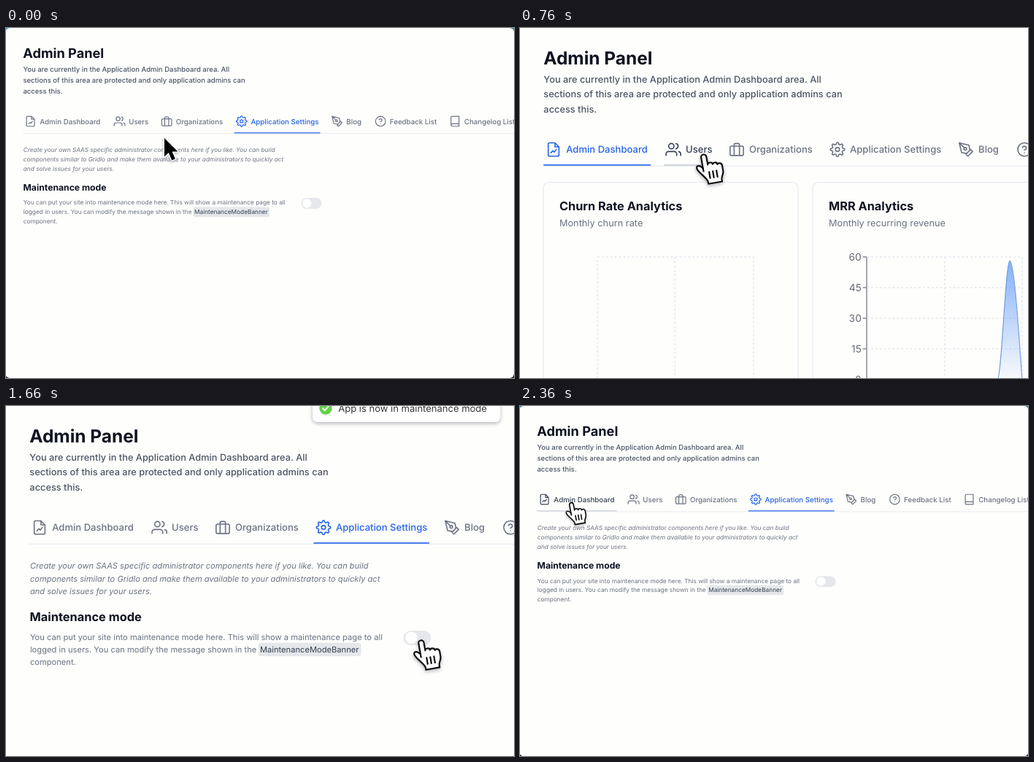
Write an HTML page that moves like this. It is 696 px wide and 480 px high and loops after 2380 ms.

```html
<!DOCTYPE html>
<html lang="en">
<head>
<meta charset="utf-8">
<title>Admin panel tour</title>
<style>
html, body { margin: 0; width: 100%; height: 100%; overflow: hidden; }
svg { display: block; width: 696px; height: 480px; }
text { font-family: Inter, sans-serif; fill: #0f1320; text-rendering: geometricPrecision; white-space: pre; }
.line { fill: none; stroke: #e3e6ef; stroke-width: .8; }
.dash { fill: none; stroke: #d9dcea; stroke-width: .75; stroke-dasharray: 2.2 2.2; }
.icon { fill: none; stroke: #6b7280; stroke-width: 1.75; stroke-linecap: round; stroke-linejoin: round; }
.tab text { fill: #6b7280; font-weight: 500; }
.tab rect { fill: none; }
.hover text { fill: #374151; }
.hover .icon { stroke: #374151; }
.hover rect { fill: #d1d5db; }
.active text { fill: #2563eb; }
.active .icon { stroke: #2563eb; }
.active rect { fill: #3b76ec; }
</style>
</head>
<body>
<svg viewBox="0 0 696 480">
  <defs>
    <linearGradient id="desk" x1="0" y1="0" x2="0" y2="1">
      <stop offset="0" stop-color="#3f8fa8"/><stop offset="1" stop-color="#23303f"/>
    </linearGradient>
    <linearGradient id="area" x1="0" y1="0" x2="0" y2="1">
      <stop offset="0" stop-color="#3b82f6" stop-opacity=".62"/>
      <stop offset="1" stop-color="#3b82f6" stop-opacity=".03"/>
    </linearGradient>
    <filter id="shade" x="-30%" y="-50%" width="160%" height="220%">
      <feDropShadow dx="0" dy="1.5" stdDeviation="1.8" flood-color="#1c2030" flood-opacity=".32"/>
    </filter>
    <clipPath id="reveal"><rect id="sweep" x="352" y="230" width="162" height="150"/></clipPath>
  </defs>
  <rect width="696" height="480" fill="url(#desk)"/>
  <g id="view"></g>
</svg>
<script>
const LOOP = 2380;
const INK = '#374151', GREY = '#6b7280', PALE = '#e5e7eb', BLUE = '#2563eb';
const $ = id => document.getElementById(id);

// ---- building blocks ----
const text = (x, y, s, size, o = {}) =>
  `<text x="${x}" y="${y}" font-size="${size}" font-weight="${o.w || 400}"` +
  `${o.c ? ` style="fill:${o.c}"` : ''}${o.i ? ' font-style="italic"' : ''}` +
  `${o.end ? ' text-anchor="end"' : ''}>${s}</text>`;
const rect = (x, y, w, h, r, attr) =>
  `<rect x="${x}" y="${y}" width="${w}" height="${h}" rx="${r}" ${attr}/>`;
const path = (d, attr) => `<path d="${d}" ${attr}/>`;
const lines = (x, y, step, rows, size, o) =>
  rows.map((s, i) => text(x, y + i * step, s, size, o)).join('');

function gear() {
  let d = '';
  for (let i = 0; i < 32; i++) {
    const a = (i - 1.5) * Math.PI / 16;
    const r = i % 4 === 1 || i % 4 === 2 ? 10.6 : 7.9;
    d += (i ? 'L' : 'M') + (12 + r * Math.sin(a)).toFixed(2) + ' ' + (12 - r * Math.cos(a)).toFixed(2);
  }
  return d + 'ZM12 9a3 3 0 1 0 0 6 3 3 0 0 0 0-6';
}

const icons = {
  file: 'M14 2H6a2 2 0 0 0-2 2v16a2 2 0 0 0 2 2h12a2 2 0 0 0 2-2V8zM14 2v6h6M8 17l3-3 2 2 3-4',
  users: 'M17 21v-2a4 4 0 0 0-4-4H5a4 4 0 0 0-4 4v2M9 3a4 4 0 1 0 0 8 4 4 0 0 0 0-8M23 21v-2a4 4 0 0 0-3-3.9M16 3.1a4 4 0 0 1 0 7.8',
  bag: 'M4 7h16a2 2 0 0 1 2 2v10a2 2 0 0 1-2 2H4a2 2 0 0 1-2-2V9a2 2 0 0 1 2-2zM16 21V5a2 2 0 0 0-2-2h-4a2 2 0 0 0-2 2v16',
  gear: gear(),
  pen: 'M12 19l7-7 3 3-7 7zM18 13l-1.5-7.5L2 2l3.5 14.5L13 18zM2 2l7.6 7.6M11 9a2 2 0 1 0 0 4 2 2 0 0 0 0-4',
  help: 'M12 2a10 10 0 1 0 0 20 10 10 0 0 0 0-20M9.1 9a3 3 0 0 1 5.8 1c0 2-3 3-3 3M12 17h.01',
  book: 'M4 19.5A2.5 2.5 0 0 1 6.5 17H20M6.5 2H20v20H6.5A2.5 2.5 0 0 1 4 19.5v-15A2.5 2.5 0 0 1 6.5 2z'
};

// label, icon, icon centre, text x, underline from, underline to
const tabs = [
  ['Admin Dashboard', 'file', 33.6, 46.3, 23.3, 132.5],
  ['Users', 'users', 155.6, 168.2, 145.8, 197],
  ['Organizations', 'bag', 220.2, 232.8, 210.5, 299.6],
  ['Application Settings', 'gear', 322.8, 335.4, 312.7, 430.5],
  ['Blog', 'pen', 453.6, 466.3, 443, 491],
  ['Feedback List', 'help', 513.2, 525.8, 503, 593],
  ['Changelog List', 'book', 615.2, 627.8, 605, 704]
];

const header = () =>
  text(23.3, 41.4, 'Admin Panel', 18.2, { w: 700 }) +
  lines(23.4, 59.5, 15.45, [
    'You are currently in the Application Admin Dashboard area. All',
    'sections of this area are protected and only application admins can',
    'access this.'
  ], 9.52, { w: 500, c: '#4b5563' }) +
  path('M23 144.8H720', 'class="line"') +
  tabs.map(([label, icon, cx, tx, a, b]) =>
    `<g class="tab">${path(icons[icon], `class="icon" transform="translate(${cx - 8.2} 119.8) scale(.68)"`)}` +
    text(tx, 131.6, label, 9.72, { w: 500 }) + rect(a, 143.1, b - a, 1.4, 0, '') + '</g>').join('');

const settings = () =>
  lines(23.8, 169.9, 13.1, [
    'Create your own SAAS specific administrator components here if you like. You can build',
    'components similar to Gridlo and make them available to your administrators to quickly act',
    'and solve issues for your users.'
  ], 8.28, { i: 1, c: GREY }) +
  text(23.5, 223.2, 'Maintenance mode', 12.2, { w: 700 }) +
  rect(256.6, 245.6, 104.4, 13.6, 2.5, `fill="${PALE}"`) +
  lines(23.8, 242.4, 12.9, [
    'You can put your site into maintenance mode here. This will show a maintenance page to all',
    'logged in users. You can modify the message shown in the',
    'component.'
  ], 8.3, { c: GREY }) +
  text(258, 255.3, 'MaintenanceModeBanner', 8.3, { c: INK }) +
  rect(404.2, 233.1, 28.2, 14.9, 7.45, 'id="track"') +
  '<circle id="knob" cx="412.2" cy="240.5" r="6.2" fill="#fff"/>';

const card = (x, title, sub) =>
  rect(x, 161.3, 259.6, 330, 6, 'class="line"') +
  text(x + 16.3, 190.1, title, 12.15, { w: 700 }) +
  text(x + 16.3, 206.4, sub, 9.5, { c: GREY });

function dashboard() {
  let s = card(23.1, 'Churn Rate Analytics', 'Monthly churn rate') +
    card(297.5, 'MRR Analytics', 'Monthly recurring revenue') +
    path('M78.1 237.5H237.2V362.5H78.1ZM157 237.5V362.5', 'class="dash"') +
    path('M432 237.5V362.5M510.8 237.5V362.5', 'class="dash"') +
    path('M352.5 237.5V362.5', 'stroke="#6d7078" stroke-width=".9"');
  for (let i = 0; i < 5; i++) {
    const y = 237.5 + i * 31.25;
    s += path(`M352.5 ${y}H510.8`, 'class="dash"') +
      path(`M348.5 ${y}h4`, 'stroke="#6d7078" stroke-width=".9"') +
      text(347.2, y + 3.7, 60 - i * 15, 10.3, { c: '#666a73', end: 1 });
  }
  const peak = 'M352.5 362.5H485.6C489.8 362.5 494 241.3 498.2 241.3S506.6 302 510.8 362.5';
  return s + `<g clip-path="url(#reveal)">${path(peak + 'Z', 'fill="url(#area)"')}` +
    path(peak, 'fill="none" stroke="#74a0dc" stroke-width=".9"') + '</g>';
}

const cross = (x, y) =>
  path(`M${x - 3.8} ${y - 3.8}l7.6 7.6m0-7.6l-7.6 7.6`, 'stroke="#e01b24" stroke-width="2.4" stroke-linecap="round"');
const check = (x, y) =>
  path(`M${x - 2.9} ${y + .2}l2 2.2 3.9-4.6`, 'fill="none" stroke="#fff" stroke-width="1.5" stroke-linecap="round" stroke-linejoin="round"');
const tick = (x, y) => rect(x - 5.2, y - 5.2, 10.4, 10.4, 1.6, 'fill="#12b52e"') + check(x, y);

function users() {
  let s = text(23.4, 170.1, 'Email', 8.8, { w: 500, c: INK }) +
    rect(23.4, 175.9, 205.6, 24.5, 4, 'class="line"') +
    text(31.4, 191.4, 'Search users', 8.2, { c: '#9ca3af' }) +
    rect(239.6, 175, 92.2, 25.8, 4.5, `fill="${BLUE}"`) +
    path('M252.5 187.8h9.6m-4.8-4.8v9.6', 'stroke="#fff" stroke-width="1.2"') +
    text(265.4, 191.3, 'Create User', 9.55, { w: 600, c: '#fff' }) +
    rect(23.4, 210.8, 720, 29.7, 4, 'fill="#f8fafc"') +
    rect(23.4, 210.8, 720, 200, 4, 'class="line"');
  for (const x of [116.1, 272.9, 331.7, 425.4, 502]) s += path(`M${x} 210.8V400`, 'class="line"');
  const cols = [39.5, 131.7, 289.3, 348, 441.2];
  ['Full Name', 'Email', 'Admin', 'Created At', 'Confirmed'].forEach((h, i) => {
    s += text(cols[i], 228.8, h, 8.75, { w: 500, c: '#4b5563' });
  });
  [['-', 'mistyfir@example.com', '02', 1], ['test', 'p.wexford50@mail.example', '02', 1],
   ['-', 'kitebyte@example.com', '01', 0]].forEach(([name, mail, day, ok], i) => {
    const y = 259.3 + i * 38;
    s += path(`M23.4 ${y - 18.8}H720`, 'class="line"') +
      text(cols[0], y + 3.5, name, 9.7) + text(cols[1], y + 3.5, mail, 9.7) +
      text(cols[3], y + 3.5, day + ' Aug 2023', 9.9) +
      cross(293.8, y) + (ok ? tick : cross)(446.3, y);
  });
  return s + path('M23.4 354.3H720', 'class="line"');
}

const toast = (id, x, w, msg) =>
  `<g id="${id}">${rect(x, -8, w, 28.5, 5, 'fill="#fff" filter="url(#shade)"')}` +
  `<circle cx="${x + 13.4}" cy="6.3" r="6.5" fill="#61d345"/>${check(x + 13.4, 6.3)}` +
  text(x + 26.2, 9.8, msg, 9.68, { c: '#363636' }) + '</g>';

const cursors = () =>
  `<g id="cursor" filter="url(#shade)"><g id="arrow">` +
  path('M0 0V25.5L5.8 20 10.2 30.5 14.9 28.5 10.6 18.4H18.5Z',
    'fill="#050505" stroke="#fff" stroke-width="2.8" stroke-linejoin="round" paint-order="stroke"') +
  '</g><g id="hand" transform="rotate(-10)" stroke="#0a0a0a" stroke-width="1.6" stroke-linecap="round" stroke-linejoin="round">' +
  path('M-2.7 2.8a2.7 2.7 0 0 1 5.4 0V11c.5-2.4 4.8-2.2 5 .4c.8-2 4.6-1.6 4.8 1c.9-1.6 4.5-.8 4.5 2V20c0 3.4-2.6 5-2.8 8V30.5H0V28C-1 24-5.5 20-8 15.5C-11 10.5-6.5 8.5-2.7 14Z', 'fill="#fff"') +
  path('M2.8 18.5v6.5M6.6 18.5v6.5M10.4 18.5v6.5M-2.7 14v3', 'fill="none"') + '</g></g>';

const pages = { settings, dashboard, users };
$('view').innerHTML = rect(-.8, 0, 696.8, 480, 6, 'fill="#fefefc"') + header() +
  Object.keys(pages).map(k => `<g id="${k}">${pages[k]()}</g>`).join('') +
  toast('toastOn', 311.6, 191.1, 'App is now in maintenance mode') +
  toast('toastOff', 299.3, 214.6, 'App is no longer in maintenance mode') + cursors();

// ---- motion ----
const ramp = (t, a, b) => Math.min(1, Math.max(0, (t - a) / (b - a)));
const ease = u => u < .5 ? 4 * u ** 3 : 1 - 4 * (1 - u) ** 3;
const smooth = u => u * u * (3 - 2 * u);
const show = (id, on) => $(id).setAttribute('display', on ? 'inline' : 'none');

// time, x, y of the pointer in page units
const route = [
  [0, 217, 151], [360, 98.5, 152], [450, 70, 132.5], [540, 70, 132.5],
  [740, 186, 133], [900, 186, 133], [1080, 264.5, 137], [1160, 264.5, 137],
  [1330, 375, 136], [1400, 375, 136], [1560, 421.8, 243], [1830, 421.8, 243],
  [2120, 64.8, 160.5], [2300, 70, 132.5], [LOOP, 70, 132.5]
];
function pointer(t) {
  let i = 1;
  while (i < route.length - 1 && route[i][0] < t) i++;
  const [a, x0, y0] = route[i - 1], [b, x1, y1] = route[i];
  const u = smooth(ramp(t, a, b));
  return [x0 + (x1 - x0) * u, y0 + (y1 - y0) * u];
}

const tabNodes = [...document.querySelectorAll('.tab')];

function draw(t) {
  const z = ease(ramp(t, 430, 720)) - ease(ramp(t, 2130, LOOP));
  $('view').setAttribute('transform', `translate(${.9 * z} ${-5.5 * z}) scale(${1 + .345 * z})`);

  const page = t < 490 || t >= 1360 ? 'settings' : t < 900 ? 'dashboard' : 'users';
  for (const k in pages) show(k, k === page);
  const active = { dashboard: 0, users: 1, settings: 3 }[page];

  const [x, y] = pointer(t);
  const over = y > 114 && y < 145 ? tabs.findIndex(b => x >= b[4] && x <= b[5]) : -1;
  tabNodes.forEach((n, i) =>
    n.setAttribute('class', 'tab' + (i === active ? ' active' : i === over ? ' hover' : '')));

  const onSwitch = page === 'settings' && x > 404 && x < 433 && y > 232 && y < 249;
  const hand = over >= 0 || onSwitch;
  show('hand', hand);
  show('arrow', !hand);
  $('cursor').setAttribute('transform', `translate(${x} ${y})`);

  const on = smooth(ramp(t, 1690, 1740)) - smooth(ramp(t, 1800, 1850));
  $('knob').setAttribute('cx', 412.2 + 12.2 * on);
  $('track').setAttribute('fill', on > .5 ? BLUE : PALE);

  const slide = (id, a, b) => {
    const u = smooth(ramp(t, a, a + 60)) - smooth(ramp(t, b, b + 60));
    show(id, u > 0);
    $(id).setAttribute('transform', `translate(0 ${-34 * (1 - u)})`);
  };
  slide('toastOn', 1580, 1820);
  slide('toastOff', 1860, 2180);

  $('sweep').setAttribute('width', 162 * smooth(ramp(t, 500, 750)));
}

const start = performance.now();
function frame() {
  draw((performance.now() - start) % LOOP);
  requestAnimationFrame(frame);
}
draw(0);
requestAnimationFrame(frame);
</script>
</body>
</html>
```
